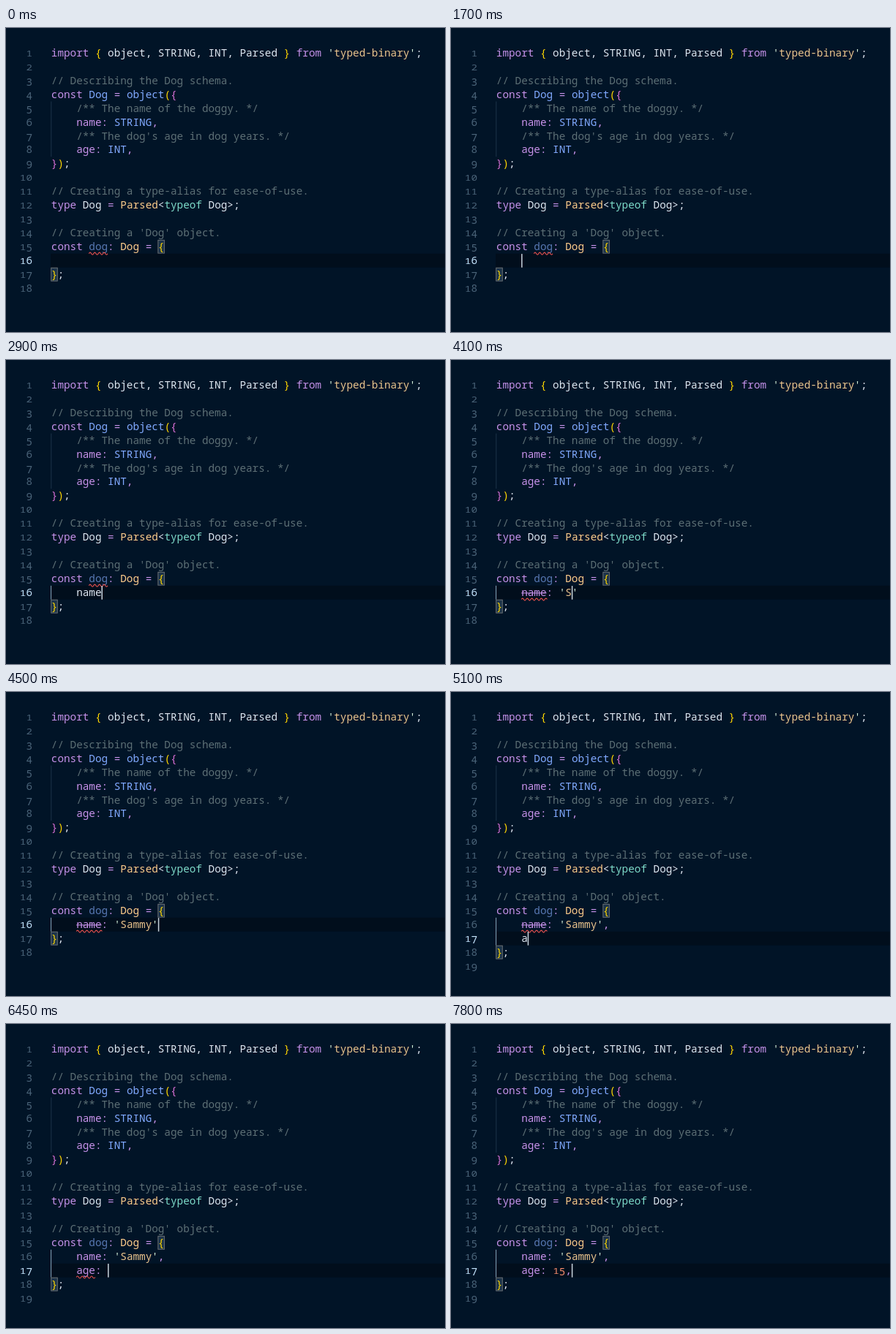
These frames come from a looping animation (600 by 416 pixels, 8 s). An HTML page:

```html
<!DOCTYPE html>
<html lang="en">
<head>
<meta charset="utf-8">
<title>Typing a typed object</title>
<style>
  html, body { margin: 0; width: 100%; height: 100%; overflow: hidden; background: #011427; }
  svg { display: block; width: 100vw; height: 100vh; }
  text { font: 500 14.325px "Noto Sans Mono", "DejaVu Sans Mono", monospace; white-space: pre; fill: #d6deeb; }
  .detail { font-size: 12.25px; fill: #ccd8e1; text-anchor: end; }
  .bold { font-weight: 700; fill: #fff; }
  .squiggle { fill: none; stroke: #ef5350; stroke-width: 1.1; }
  .bracket { fill: #5f7e97; fill-opacity: .3; stroke: #888; stroke-opacity: .75; stroke-width: 1; }
</style>
</head>
<body>
<svg viewBox="0 0 600 416">
  <g id="fixed"></g>
  <g id="live"></g>
</svg>
<script>
const LOOP = 8000, LEFT = 61.8, CHAR = 8.595, ROW = 18.94, TOP = 24.7;
const COLORS = {
  w: '#dfe6f0', p: '#c792ea', b: '#82aaff', y: '#ffd700', o: '#da70d6', c: '#5d6f75',
  s: '#ecc48d', q: '#d9f5dd', t: '#ffcb8b', g: '#7fdbca', n: '#f78c6c', d: '#5878b2'
};

// Each token is a colour key followed by its text.
const CODE = {
  1: ['pimport ', 'y{', 'w object, STRING, INT, Parsed ', 'y}', 'p from ', "q'", 'styped-binary', "q'", 'w;'],
  3: ['c// Describing the Dog schema.'],
  4: ['pconst ', 'bDog ', 'p= ', 'bobject', 'y(', 'o{'],
  5: ['c    /** The name of the doggy. */'],
  6: ['p    name: ', 'bSTRING', 'p,'],
  7: ["c    /** The dog's age in dog years. */"],
  8: ['p    age: ', 'bINT', 'p,'],
  9: ['o}', 'y)', 'w;'],
  11: ['c// Creating a type-alias for ease-of-use.'],
  12: ['ptype ', 'wDog ', 'p= ', 'tParsed', 'w<', 'gtypeof ', 'wDog>;'],
  14: ["c// Creating a 'Dog' object."],
  15: ['pconst ', 'ddog', 'p: ', 'tDog ', 'p= ', 'y{']
};

// Body of the object over time; "|" marks the caret.
const NAME_LINE = "name: 'Sammy',\n";
const EDITS = [
  [0, '|'], [2200, 'n|'], [2400, 'na|'], [2550, 'nam|'], [2850, 'name|'],
  [3250, 'name:|'], [3400, 'name: |'], [3550, "name: '|'"],
  [3900, "name: 'S|'"], [4150, "name: 'Sa|'"], [4250, "name: 'Sam|'"],
  [4350, "name: 'Samm|'"], [4450, "name: 'Sammy|'"], [4500, "name: 'Sammy'|"],
  [4600, "name: 'Sammy',|"], [4800, NAME_LINE + '|'],
  [5050, NAME_LINE + 'a|'], [5250, NAME_LINE + 'ag|'], [5850, NAME_LINE + 'age|'],
  [6150, NAME_LINE + 'age:|'], [6350, NAME_LINE + 'age: |'],
  [6600, NAME_LINE + 'age: 1|'], [6700, NAME_LINE + 'age: 15|'], [6850, NAME_LINE + 'age: 15,|']
];
const POPUPS = [[2300, 2850, 'name', 'string'], [5150, 5850, 'age', 'number']];
const CARET_OFF = [[0, 450], [1050, 1500], [2000, 2200], [7300, 7750]];

const colX = col => LEFT + col * CHAR;
const rowTop = row => TOP + (row - 1) * ROW;
const baseline = row => rowTop(row) + 14.2;
const within = (t, [from, to]) => t >= from && t < to;
const escape = s => s.replace(/&/g, '&amp;').replace(/</g, '&lt;');

const rect = (x, y, w, h, attrs) => `<rect x="${x}" y="${y}" width="${w}" height="${h}" ${attrs}/>`;
const tokens = (list, row, col = 0) => `<text x="${colX(col)}" y="${baseline(row)}">` +
  list.map(k => `<tspan style="fill:${COLORS[k[0]]}">${escape(k.slice(1))}</tspan>`).join('') + '</text>';

// Old-style figures: 0-2 sit at x-height, 3 4 5 7 9 hang below the baseline.
const figures = (digits, x, row, color) => [...digits].map((digit, i) => {
  const drop = '34579'.includes(digit) ? 2 : 0;
  const height = '012'.includes(digit) ? .75 : 1;
  return `<text transform="translate(${x + i * CHAR} ${baseline(row) + drop}) scale(1 ${height})" style="fill:${color}">${digit}</text>`;
}).join('');

const lineNumber = (n, active) =>
  figures(String(n), 36 - CHAR * String(n).length, n, active ? '#c5e4fd' : '#4b6479');

function squiggle(row, col, length) {
  const y = rowTop(row) + 17.6;
  let path = `M${colX(col)} ${y + 1.2}`;
  for (let x = 0, up = true; x < length * CHAR - 1; x += 3.2, up = !up) path += `q1.6 ${up ? -3 : 3} 3.2 0`;
  return `<path class="squiggle" d="${path}"/>`;
}

const bracket = (row, col) => rect(colX(col) - .1, rowTop(row) + .5, CHAR, ROW - 1, 'class="bracket"');

function bodyLine(line, row) {
  const list = [];
  let out = '', col = 4;
  for (const [part] of line.matchAll(/^\w+:|\d+|\w+|'|,|\s+/g)) {
    if (/^\d/.test(part)) {
      out += figures(part, colX(col), row, COLORS.n);
      list.push('w' + ' '.repeat(part.length));
    } else {
      const kind = part === "'" ? 'q' : /[:,]$/.test(part) ? 'p' : line.includes("'") ? 's' : 'w';
      list.push(kind + part);
    }
    col += part.length;
  }
  return tokens(list, row, 4) + out;
}

function popup(t, x, row, typed) {
  const found = POPUPS.find(p => within(t, p));
  if (!found) return '';
  const [, , label, type] = found, y = rowTop(row + 1);
  return rect(x - .5, y + .5, 431, 21.6, 'fill="#1c2b3d"') +
    rect(x, y + 1.6, 430, 19.4, 'fill="#5f7e97"') +
    `<path d="M4 10.2 11.5 6.5 17 8.8V13.2L9.5 17 4 14.6ZM4 10.2 9.5 12.6 17 8.8M9.5 12.6V17" transform="translate(${x} ${y - .5})" fill="none" stroke="#f2f6f9" stroke-width="1.2" stroke-linejoin="round"/>` +
    `<text x="${x + 22}" y="${y + 15.6}"><tspan class="bold">${typed}</tspan>${label.slice(typed.length)}</text>` +
    `<text class="detail" x="${x + 420.5}" y="${y + 15}">(property) ${label}: ${type}</text>`;
}

function scene(t) {
  const text = EDITS.findLast(e => t >= e[0])[1];
  const lines = text.replace('|', '').split('\n');
  const before = text.split('|')[0].split('\n');
  const typed = before.at(-1);
  const row = 15 + lines.length, close = row + 1;
  const caretX = colX(4 + typed.length);

  let out = rect(61, rowTop(row), 539, ROW, 'fill="#010e1c"');
  for (let n = 16; n <= close + 1; n++) out += lineNumber(n, n === row);
  if (t >= 2200) out += rect(61, rowTop(16), 1.1, ROW * lines.length, 'fill="#7e97ac"');
  lines.forEach((line, i) => out += bodyLine(line, 16 + i));
  out += bracket(close, 0) + tokens(['y}', 'w;'], close);

  if (t < 3200) out += squiggle(15, 6, 3);
  if (within(t, [3200, 5650])) {
    out += squiggle(16, 4, 4) + rect(colX(4), rowTop(16) + 9.6, 4 * CHAR, 1, `fill="${COLORS.p}"`);
  }
  if (within(t, [5650, 7150])) out += squiggle(17, 4, t < 5850 ? 2 : 3);

  if (!CARET_OFF.some(span => within(t, span))) {
    out += rect(caretX - .1, rowTop(row) + .3, 1.5, ROW - .3, 'fill="#c9d3dc"');
  }
  return out + popup(t, caretX, row, typed);
}

let fixed = rect(61.3, rowTop(5), 1, ROW * 4, 'fill="#1d3249"') + bracket(15, 17);
for (let n = 1; n <= 15; n++) fixed += lineNumber(n) + (CODE[n] ? tokens(CODE[n], n) : '');
document.getElementById('fixed').innerHTML = fixed;

const live = document.getElementById('live');
const start = performance.now();
let shown = '';
function frame() {
  const next = scene((performance.now() - start) % LOOP);
  if (next !== shown) live.innerHTML = shown = next;
  requestAnimationFrame(frame);
}
frame();
</script>
</body>
</html>
```
